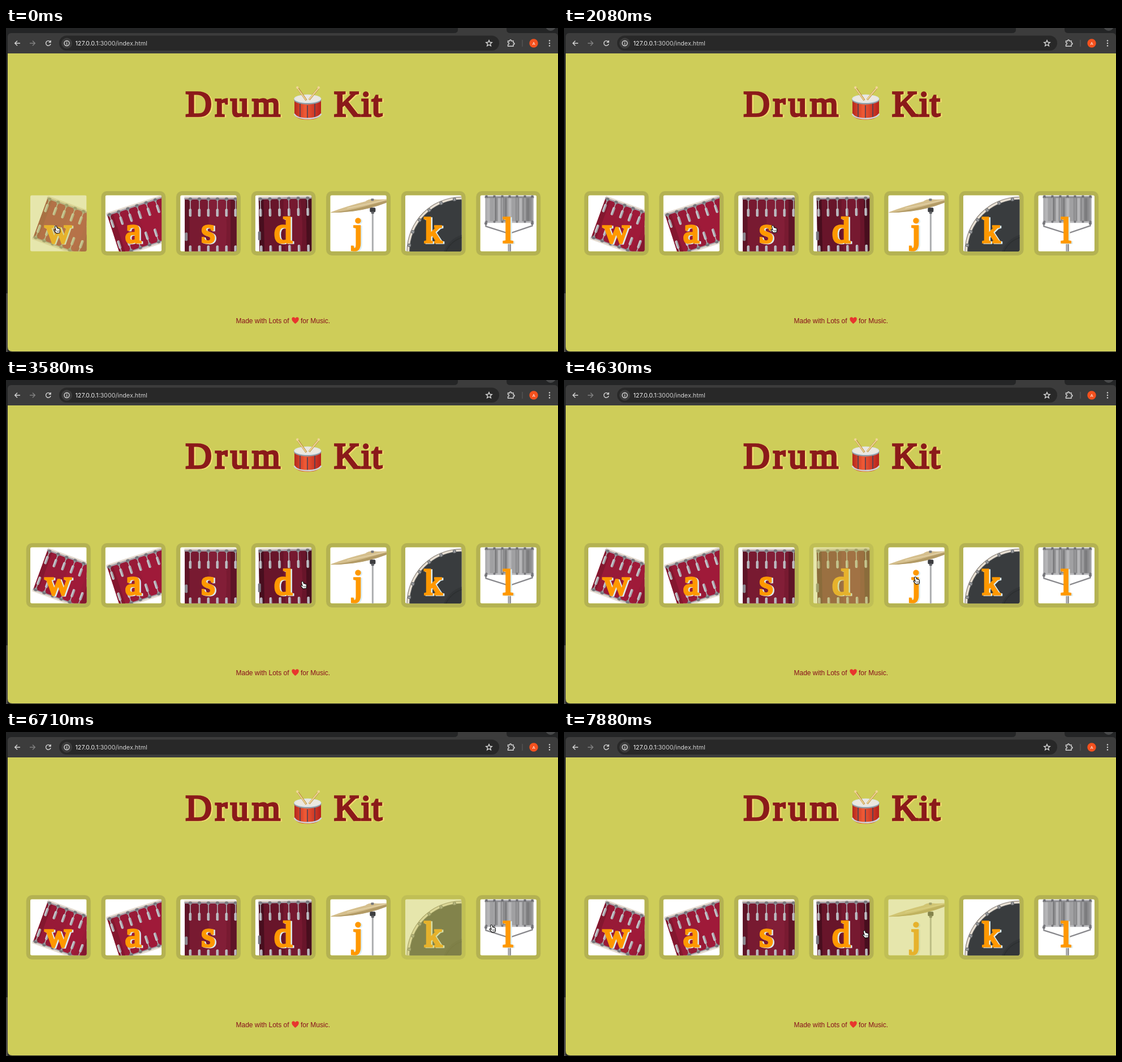
These frames come from a looping animation (976x574 px, 8000 ms). An HTML page:

```html
<!DOCTYPE html>
<html lang="en">
<head>
<meta charset="utf-8">
<title>Drum Kit</title>
<style>
  html, body { margin: 0; width: 100%; height: 100%; overflow: hidden; background: #1f1f20; }
  svg { display: block; width: 976px; height: 574px; }
  .slab { font: 64px "Liberation Serif", serif; stroke-width: 3.6; stroke-linejoin: miter; stroke-miterlimit: 2; }
  .url { font: 10.75px Inter, sans-serif; }
  .note { font: 12px "Liberation Sans", sans-serif; fill: #870f1c; }
  .icon { fill: none; stroke: #d5d5d5; stroke-width: 1.4; }
</style>
</head>
<body>
<svg id="stage" viewBox="0 0 976 574"></svg>
<script>
const LOOP = 8000, PITCH = 132.58, SIZE = 99.5;
const KEYS = [...'wasdjkl'];

// time, pointer x, pointer y, pressed key
const STEPS = [
  [0, 90, 357, 'w'],
  [450, 112, 356], [600, 190, 354], [740, 256, 354],
  [1490, 258, 354, 'a'], [1640, 272, 354, 'a'], [1780, 310, 355], [1930, 352, 356], [2080, 371, 356],
  [2980, 373, 356, 's'], [3130, 390, 358, 's'], [3280, 440, 361], [3430, 500, 363], [3580, 526, 363],
  [4630, 623, 355, 'd'], [4780, 630, 354, 'd'],
  [5070, 645, 354], [5220, 705, 354], [5370, 754, 354, 'j'],
  [5670, 852, 354, 'k'], [5820, 887, 352, 'k'],
  [6120, 876, 351], [6270, 815, 350], [6420, 762, 350, 'l'],
  [6710, 860, 348, 'k'], [6860, 884, 350, 'k'], [7000, 835, 351], [7150, 765, 352, 'l'],
  [7450, 735, 354], [7600, 665, 356, 'k'], [7740, 590, 357], [7880, 533, 358, 'j'],
];

const rect = (x, y, w, h, fill, r = 0) =>
  `<rect x="${x}" y="${y}" width="${w}" height="${h}" rx="${r}" fill="${fill}"/>`;
const circle = (x, y, r, fill) => `<circle cx="${x}" cy="${y}" r="${r}" fill="${fill}"/>`;
const path = (d, fill, stroke = 'none', width = 1) =>
  `<path d="${d}" fill="${fill}" stroke="${stroke}" stroke-width="${width}"/>`;
const icon = d => `<path class="icon" d="${d}"/>`;
const group = (transform, content) => `<g transform="${transform}">${content}</g>`;

// Slab lettering (outlined serif) with a coloured copy just behind it
function slab(text, x, y, fill, shadow, attrs = '') {
  const layer = (color, dx, dy) =>
    `<text class="slab" x="${x + dx}" y="${y + dy}" fill="${color}" stroke="${color}" ${attrs}>${text}</text>`;
  return layer(shadow, 2.5, .8) + layer(fill, 0, 0);
}

function lug(x, rod, capsule) {
  return rect(x - 3, -1, 6, 6, '#77777d', 2) + rect(x - .8, 3, 1.6, rod, '#b0aeb4')
    + rect(x - 2.3, rod, 4.6, capsule, '#c6c5ca', 2) + rect(x + .5, rod + 1, 1.3, capsule - 2, '#96949c');
}

// A drum with its top left corner at the origin
function drum({ width, height, first, gap, rod, capsule, colors: [base, light, dark] }) {
  let lugs = '';
  for (let x = first; x < width; x += gap) lugs += lug(x, rod, capsule);
  return rect(0, 0, width, height, base)
    + rect(0, 0, width * .09, height, dark)
    + path(`M${width * .46} 0H${width * .76}Q${width * .84} ${height / 2} ${width * .74} ${height}H${width * .5}Q${width * .43} ${height / 2} ${width * .46} 0Z`, light)
    + rect(width * .87, 0, width * .13, height, dark)
    + rect(-1, -3, width + 2, 3, '#e4dbd0', 1) + rect(-1, 0, width + 2, 2.5, '#a6a4aa')
    + rect(-1, height - 2, width + 2, 2.5, '#a6a4aa') + rect(-1, height, width + 2, 3, '#e4dbd0', 1)
    + lugs + group(`translate(0 ${height}) scale(1 -1)`, lugs);
}

const RED = ['#981a37', '#9f1a39', '#84172f'];
const WINE = ['#781a31', '#821e37', '#5e1427'];
const DEEP = ['#68152a', '#761930', '#480e1e'];

function cymbal() {
  return rect(73.2, 24, 3.6, 76, '#c9cacc') + rect(74.6, 24, 1, 76, '#8e9092')
    + path('M1 30Q30 19 62 11Q68 6 76 7Q90 8 100 7V12Q72 24 40 28Q16 31 1 31Z', '#d5bf8d')
    + path('M1 31Q30 28 60 20L100 9V13Q72 24 40 28.5Q16 31 1 31Z', '#b39b66')
    + path('M30 23Q60 17 98 8', 'none', '#e9dab4', 1)
    + rect(72, 6, 5, 4, '#77777a', 1) + rect(70, 22, 10, 8, '#3c3d40', 2) + rect(72.5, 29, 5, 4, '#626468', 1);
}

function bassDrum() {
  let lugs = '';
  for (let deg = 187; deg < 270; deg += 15) {
    const a = deg * Math.PI / 180;
    lugs += group(`translate(${100 + 93.5 * Math.cos(a)} ${100 + 93.5 * Math.sin(a)}) rotate(${deg})`,
      rect(-3, -3, 6, 6, '#77797c', 2) + rect(-2, -1, 4, 2, '#a4a6a8'));
  }
  return circle(100, 100, 97.5, '#8a8279') + circle(100, 100, 96.3, '#e7dfd3') + circle(100, 100, 92.8, '#4c4f51')
    + circle(100, 100, 91.5, '#393c3e') + path('M68 100Q78 77 100 70V100Z', '#333638')
    + path('M72 100Q80 82 100 75', 'none', '#2c2f30', 1.5) + lugs;
}

function marchingToms() {
  const body = [9, 28, 47, 66].map((x, i) =>
    rect(x, 4, 28, 44, i % 2 ? '#8d8d8f' : '#a0a0a2') + rect(x + 3, 4, 5, 44, '#b6b6b8')
    + rect(x + 16, 4, 5, 44, '#7c7c7e')).join('');
  const pins = [11, 25, 39, 52, 65, 79, 92].map(x =>
    rect(x - 2, 0, 4, 5, '#6d6d71', 1) + rect(x - .5, 4, 1, 41, '#b4b4b6') + circle(x, 47, 2, '#77777b')).join('');
  return body + rect(8, 0, 87, 2, '#d9d9da') + rect(8, 2, 87, 3, '#8b8b8f') + rect(8, 46, 87, 3, '#b9b9bc') + pins
    + path('M10 50V55L51 68L92 54V49', 'none', '#88888c', 2.4) + rect(49, 60, 5.5, 40, '#929296')
    + rect(50.5, 66, 1.5, 34, '#c3c3c6') + circle(10, 50, 2.5, '#77777b') + circle(92, 50, 2.5, '#77777b');
}

const ART = {
  w: () => group('translate(31 4) rotate(20)',
    drum({ width: 100, height: 76, first: 4, gap: 16, rod: 11, capsule: 15, colors: RED })),
  a: () => group('translate(3 34) rotate(-18)',
    drum({ width: 116, height: 76, first: 4, gap: 17, rod: 11, capsule: 15, colors: RED })),
  s: () => group('translate(8 5)',
    drum({ width: 93, height: 117, first: 9.7, gap: 16, rod: 19, capsule: 14, colors: WINE }))
    + rect(8, 66, 5, 15, '#8c8990', 2),
  d: () => group('translate(6 5) rotate(-1)',
    drum({ width: 96, height: 117, first: 3, gap: 16.7, rod: 19, capsule: 14, colors: DEEP }))
    + rect(5, 64, 5, 16, '#77747d', 2),
  j: cymbal, k: bassDrum, l: marchingToms,
};

function tile(key, i) {
  return group(`translate(${43 + i * PITCH} 296.3)`, `<g id="key-${key}">
    <rect class="ring" x="-3.6" y="-3.6" width="${SIZE + 7.2}" height="${SIZE + 7.2}" rx="6.5" fill="none" stroke="#b4b252" stroke-width="7.3"/>
    <g clip-path="url(#face)">${rect(0, 0, SIZE, SIZE, '#fff')}${ART[key]()}
    ${slab(key, 49.2, 83.7, '#ff9800', '#dbedf3', 'text-anchor="middle"')}</g></g>`);
}

function browser() {
  return rect(0, 0, 976, 574, '#242526') + rect(0, 470, 3, 104, '#4b4a47')
    + rect(3, 9, 973, 40, '#3c3c3c', 6) + rect(790, 0, 104, 20, '#3c3c3c')
    + path('M780 0H799V3Q799 9 792 9H780ZM885 0H976V9H892Q885 9 885 3Z', '#242526')
    + circle(963, -4, 9, '#48494a') + rect(94, 13.5, 778, 26.5, '#282828', 13.2)
    + circle(107.5, 27, 9.5, '#3c3c3c')
    + icon('M25 27H16M20 22.7L15.7 27L20 31.3')
    + `<g opacity=".45">${icon('M42 27H51M47 22.7L51.3 27L47 31.3')}</g>`
    + icon('M78.2 24.3A4.3 4.3 0 1 0 79 28M79 22V25.3H75.6')
    + icon('M112 27A4.5 4.5 0 1 1 103 27A4.5 4.5 0 1 1 112 27M107.5 26.5V29.5M107.5 24.3V25.5')
    + `<text class="url" x="122.5" y="30.7" fill="#f1f1f1">127.0.0.1<tspan fill="#d0d0d0">:3000/index.html</tspan></text>`
    + icon('M854 21.8L855.5 25.3L859.2 25.6L856.4 28L857.3 31.7L854 29.7L850.7 31.7L851.6 28L848.8 25.6L852.5 25.3Z')
    + icon('M887.5 23H890.5Q890.5 21 892 21T893.5 23H897V26.2Q899 26.2 899 27.7T897 29.2V32.2H887.5V29.5Q889.5 29.3 889.5 27.6T887.5 25.8Z')
    + rect(912.5, 21, 1, 12, '#5e5e5e') + circle(933, 27, 7.7, '#f4511e')
    + '<text x="933" y="29.8" text-anchor="middle" font-family="Roboto, sans-serif" font-size="8" fill="#fff">A</text>'
    + [22.5, 27, 31.5].map(y => circle(961, y, 1.2, '#d5d5d5')).join('')
    + path('M3 45H976V573H11Q3 573 3 565Z', '#cecd59');
}

function titleDrum() {
  return path('M510 126V153Q514 162.5 533 162.5T557 153V126Z', 'url(#redBody)')
    + path('M520 134V158M533 137V160M546 134V158', 'none', '#37405a', 1.4)
    + path('M509.5 152Q514 160.5 533 160.5T557.5 152', 'none', '#cfd5da', 2.4)
    + '<ellipse cx="533.3" cy="127" rx="24.3" ry="8.5" fill="#8f9aa2"/>'
    + '<ellipse cx="533.3" cy="125.4" rx="24" ry="7.6" fill="#dfe5e8"/>'
    + '<ellipse cx="533.3" cy="125.2" rx="21.5" ry="5.8" fill="#ece8e0"/>'
    + path('M515.5 106L531 128M553 106L536 127', 'none', '#b88b3d', 3.4)
    + path('M515 106L530.5 127.5M553 106L536 126.5', 'none', '#efd596', 2)
    + circle(515.2, 105.5, 2.2, '#efd596') + circle(552.8, 105.5, 2.2, '#efd596');
}

const POINTER = path('M-2.5 -6C-1.4 -6.7 -.6 -6 -.3 -5L.4 -2.4Q1.5 -3.1 2.1 -1.9Q3.3 -2.5 3.8 -1.2Q5.1 -1.6 5.4 0C5.7 2 5.8 4 4.8 6L-.7 6.8Q-3 4.4 -4.7 2.2C-5.6 .9 -4 .1 -2.8 1L-1.9 1.7L-3.5 -4.2Q-3.7 -5.6 -2.5 -6Z', '#fff', '#111', 1.1)
  + path('M.3 2L.9 4.7M2.1 1.7L2.5 4.3M3.8 1.4L4 3.9', 'none', '#222', .7);

document.getElementById('stage').innerHTML = `<defs>
  <clipPath id="face"><rect width="${SIZE}" height="${SIZE}" rx="3"/></clipPath>
  <linearGradient id="redBody"><stop stop-color="#b5281d"/><stop offset=".4" stop-color="#f05a35"/><stop offset="1" stop-color="#b5221c"/></linearGradient>
  </defs>`
  + browser()
  + slab('Drum', 317.5, 156, '#8b1a1a', '#f3db70', 'letter-spacing="6"')
  + titleDrum()
  + slab('Kit', 580, 156, '#8b1a1a', '#f3db70', 'letter-spacing="1.5"')
  + KEYS.map(tile).join('')
  + '<text class="note" x="406.5" y="522.5">Made with Lots of</text>'
  + path('M511.5 524Q505.3 519.5 505.3 515.6C505.3 511.7 510 511.3 511.5 514.6C513 511.3 517.8 511.7 517.8 515.6Q517.8 519.5 511.5 524Z', '#e8352e')
  + '<text class="note" x="521" y="522.5">for Music.</text>'
  + `<g id="pointer">${POINTER}</g>`;

const pointer = document.getElementById('pointer');
const tiles = KEYS.map(key => document.getElementById('key-' + key));
const firstRing = tiles[0].querySelector('.ring');
const start = performance.now();

function draw(now) {
  const t = Math.max(0, now - start) % LOOP;
  const [, x, y, pressed] = STEPS.findLast(step => step[0] <= t);
  pointer.setAttribute('transform', `translate(${x} ${y})`);
  KEYS.forEach((key, i) => tiles[i].setAttribute('opacity', key === pressed ? .5 : 1));
  firstRing.setAttribute('visibility', pressed === 'w' ? 'hidden' : 'visible');
  requestAnimationFrame(draw);
}
draw(start);
</script>
</body>
</html>
```
